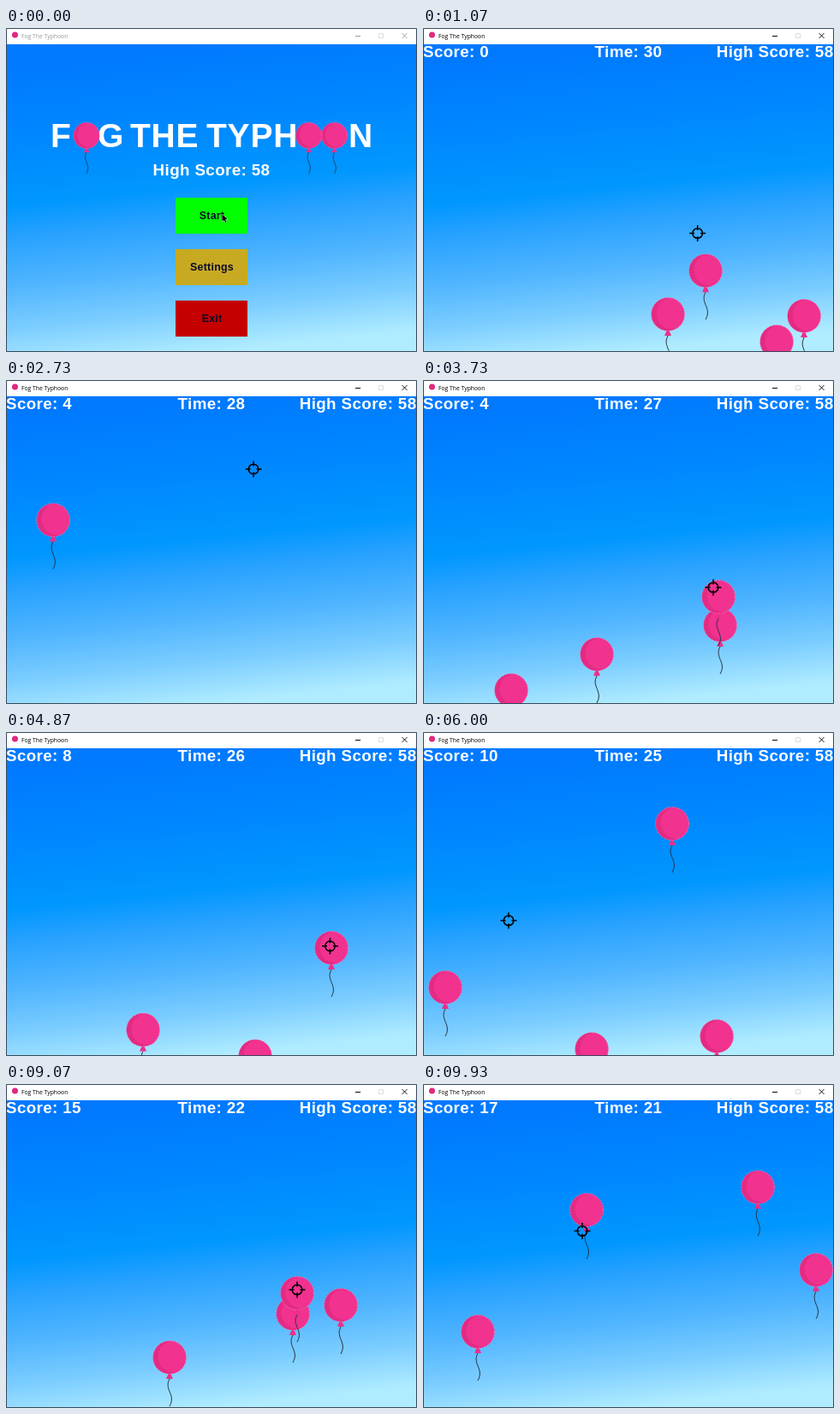
An HTML page with a canvas that plays this animation: 480 px wide and 378 px high, repeating every 9.99 s.

```html
<!DOCTYPE html>
<html lang="en">
<head>
<meta charset="utf-8">
<title>Fog The Typhoon</title>
<style>
html, body { margin: 0; width: 480px; height: 378px; overflow: hidden; }
canvas { display: block; }
</style>
</head>
<body>
<canvas id="stage" width="480" height="378"></canvas>
<script>
const c = document.getElementById('stage').getContext('2d');
const LOOP = 9990, START = 200, STEP = 1000 / 15, POP_GAP = 230;
const SANS = '"Liberation Sans", Arial, sans-serif';

// Key moments: where the crosshair is, the balloons it pops next (in turn), the ones it misses.
const waves = [
  { t: 1000, aim: [318, 238], pops: [[330, 300]], missed: [] },
  { t: 1870, aim: [387, 245], pops: [[445, 208], [413, 206], [286, 206]], missed: [[55, 301]] },
  { t: 3730, aim: [339, 242], pops: [[345, 253], [347, 286], [203, 320], [103, 362], [380, 480], [160, 530]], missed: [] },
  { t: 6000, aim: [100, 220], pops: [[26, 298], [197, 370], [343, 355], [391, 420]], missed: [[291, 107]] },
  { t: 7600, aim: [391, 218], pops: [[47, 310]], missed: [] },
  { t: 9070, aim: [340, 240], pops: [[340, 244], [335, 268]], missed: [[391, 258], [191, 319]] },
  { t: 9930, aim: [186, 171.5], pops: [], missed: [[64, 289], [459, 217]] }
];

// Three climbing speeds (px/ms), chosen by column.
const speed = x => .16 + .04 * ((x + 2) % 3);

const balloons = [], stops = [[START + 200, 255, 221]];
for (const { t, aim, pops, missed } of waves) {
  stops.push([t, ...aim]);
  [...pops, ...missed].forEach(([x, y], i) => {
    const pop = i < pops.length ? t + POP_GAP * (i + 1) : Infinity;
    const at = time => y - speed(x) * (time - t);
    balloons.unshift({ x, at, pop });
    if (pop < LOOP) stops.push([pop, x, at(pop)]);
  });
}

const sky = c.createLinearGradient(240, 18, 276, 374);
[[0, '#0079ff'], [.22, '#0086ff'], [.46, '#0097ff'], [.56, '#26a1ff'],
 [.72, '#50b5ff'], [.86, '#7bcdff'], [1, '#b0ecff']].forEach(s => sky.addColorStop(...s));

function rect(x, y, w, h, color) {
  c.fillStyle = color;
  c.fillRect(x, y, w, h);
}

function text(s, x, y, size, color = '#fff', align = 'left', font = 'bold ' + size + 'px ' + SANS) {
  c.font = font;
  c.letterSpacing = .02 * size + 'px';
  c.fillStyle = color;
  c.textAlign = align;
  c.fillText(s, x, y);
}

function stroke(color, width, path) {
  c.strokeStyle = color;
  c.lineWidth = width;
  c.beginPath();
  path();
  c.stroke();
}

function disc(x, y, r, color) {
  c.fillStyle = color;
  c.beginPath();
  c.arc(x, y, r, 0, 7);
  c.fill();
}

function balloon(x, y, scale = 1) {
  c.save();
  c.translate(x, y);
  c.scale(scale, scale);
  stroke('#283246', 1, () => {
    c.moveTo(0, 25);
    c.bezierCurveTo(-7, 38, 8, 43, 0, 57);
  });
  c.fillStyle = '#ee2e8b';
  c.beginPath();
  c.moveTo(-1, 18);
  c.lineTo(-4, 25);
  c.lineTo(4, 25);
  c.lineTo(1, 18);
  c.fill();
  disc(0, 0, 19.5, '#e32b83');
  c.save();
  c.clip();
  disc(5, -1, 18.5, '#f1328f');
  c.restore();
  c.setLineDash([2, 1.5]);
  stroke('rgba(255,170,215,.6)', .8, () => c.arc(0, 0, 19.4, 0, 7));
  c.restore();
}

function crosshair(x, y) {
  stroke('#000', 1.5, () => {
    c.arc(x, y, 5.8, 0, 7);
    for (const [dx, dy] of [[1, 0], [-1, 0], [0, 1], [0, -1]]) {
      c.moveTo(x + 3.5 * dx, y + 3.5 * dy);
      c.lineTo(x + 9.5 * dx, y + 9.5 * dy);
    }
  });
}

function pointer(x, y) {
  c.beginPath();
  [[0, 0], [0, 8], [2, 6.5], [4, 9.5], [5, 9], [3.5, 6], [6, 5.5]]
    .forEach(([dx, dy]) => c.lineTo(x + dx, y + dy));
  c.closePath();
  c.strokeStyle = '#fff';
  c.lineWidth = .8;
  c.stroke();
  c.fillStyle = '#000';
  c.fill();
}

function aimAt(t) {
  const i = stops.findIndex(s => s[0] > t);
  if (i < 1) return stops.at(i).slice(1);
  const [t0, x0, y0] = stops[i - 1], [t1, x1, y1] = stops[i];
  let u = (t - t0) / (t1 - t0);
  u *= u * (3 - 2 * u);
  return [x0 + (x1 - x0) * u, y0 + (y1 - y0) * u];
}

function menu() {
  for (const [s, x] of [['F', 52], ['G', 107], ['THE', 145], ['TYPH', 234], ['N', 400]]) text(s, x, 139, 39);
  for (const x of [94, 353.5, 383.5]) balloon(x, 125.5, .78);
  text('High Score: 58', 240, 171.5, 18.8, '#fff', 'center');
  [['Start', '#00ff00'], ['Settings', '#c8aa22'], ['Exit', '#c40000']].forEach(([label, color], i) => {
    rect(198, 198 + 60 * i, 84, 42, color);
    text(label, 240.5, 222.5 + 60 * i, 12.4, '#0a0a28', 'center');
  });
  pointer(252.5, 217.5);
}

function game(t) {
  for (const { x, at, pop } of balloons) {
    const y = at(t);
    if (t < pop && y < 400 && y > 20) balloon(x, y);
  }
  const score = balloons.filter(b => t >= b.pop).length;
  text('Score: ' + score, 0, 34, 18.8);
  text('Time: ' + (30 - Math.floor((t - START) / 1000)), 240, 34, 18.8, '#fff', 'center');
  text('High Score: 58', 479.5, 34, 18.8, '#fff', 'right');
  crosshair(...aimAt(t));
}

function frame(active) {
  const ink = active ? '#000' : '#999';
  rect(0, 0, 480, 19, '#fff');
  stroke('#3a4a5c', 1, () => c.rect(.5, .5, 479, 377));
  disc(10.5, 8, 3.5, '#e0287f');
  text('Fog The Typhoon', 18, 12, 0, ink, 'left', '6.8px "Open Sans", "Noto Sans", sans-serif');
  rect(408, 9, 6, 1, ink);
  stroke('#dcdce8', 1, () => c.rect(435.5, 6.5, 5, 5));
  stroke(ink, .9, () => {
    c.moveTo(462.5, 6);
    c.lineTo(468.5, 12);
    c.moveTo(468.5, 6);
    c.lineTo(462.5, 12);
  });
}

function draw() {
  const step = Math.floor((performance.now() % LOOP + 5) / STEP);
  const t = Math.round(step * STEP / 10) * 10;
  rect(0, 0, 480, 378, sky);
  if (t < START) menu();
  else game(t);
  frame(t >= 70);
  requestAnimationFrame(draw);
}
draw();
</script>
</body>
</html>
```
